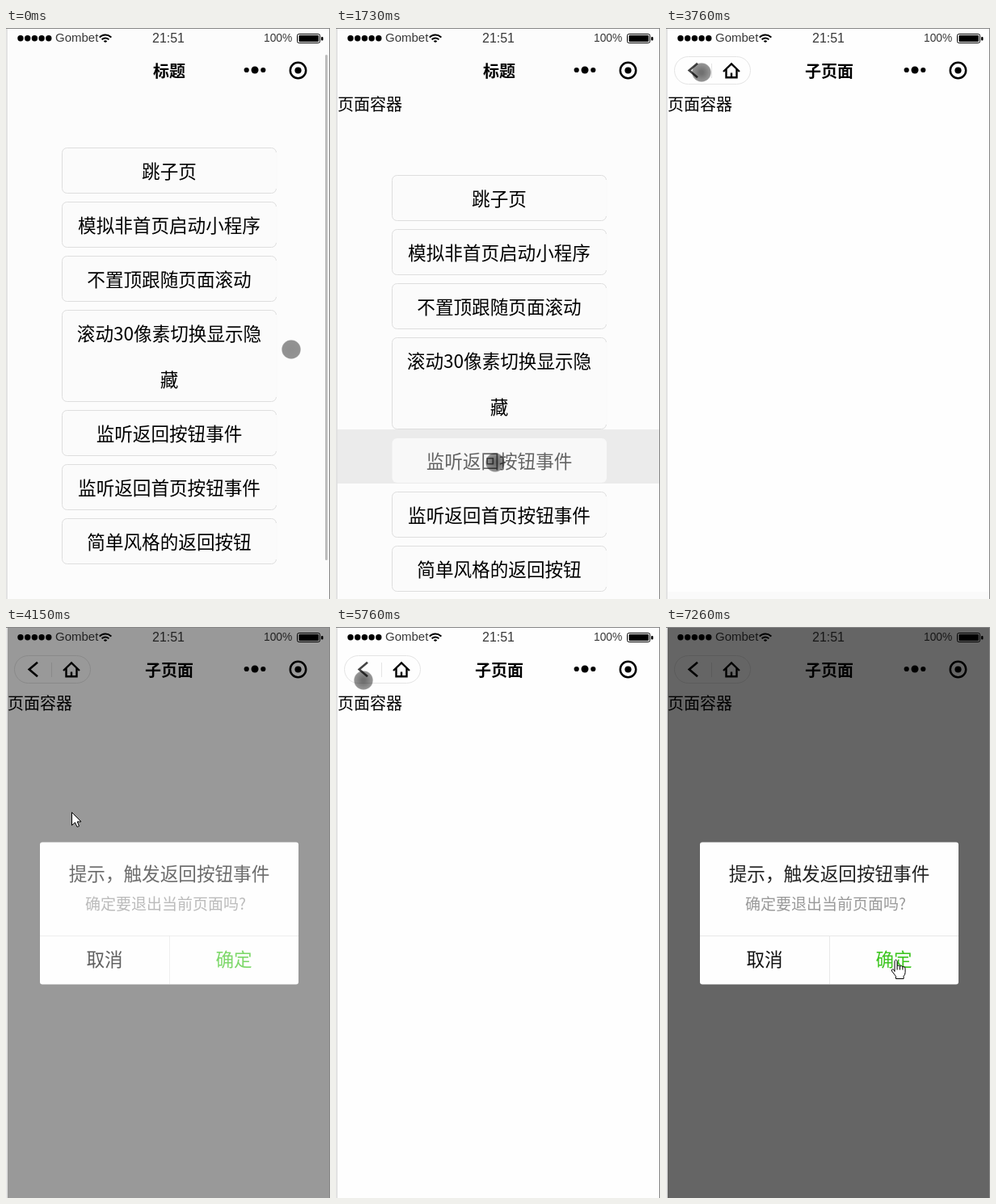
These frames come from a looping animation (401x707 px, 8000 ms). An HTML page with a canvas:

```html
<!DOCTYPE html>
<html lang="zh">
<head>
<meta charset="utf-8">
<title>标题</title>
<style>
html, body { margin: 0; width: 100%; height: 100%; overflow: hidden; background: #fcfcfc; }
canvas { display: block; width: 401px; height: 707px; }
</style>
</head>
<body>
<canvas id="stage" width="401" height="707"></canvas>
<script>
const ctx = document.getElementById('stage').getContext('2d');
const CJK = '"Noto Sans CJK SC", "Noto Sans CJK", sans-serif';
const LATIN = '"Liberation Sans", Arial, sans-serif';
const PAGE = '#fcfcfc', SUBPAGE = '#fefefe', INK = '#000';

// The picture refreshes once per beat; all timing below is in beats.
const LOOP = 8000, BEAT = 134.4, LEAD = 20;

const START = { x: 353, y: 398 };
const MOVES = [
  { from: 4, to: 11, x: 197, y: 538 },
  { from: 18, to: 26, x: 44, y: 55 },
  { from: 29, to: 36, x: 119, y: 411 },
  { from: 36, to: 43, x: 34, y: 66 },
  { from: 45, to: 54, x: 284, y: 411 },
];

const BUTTONS = [['跳子页'], ['模拟非首页启动小程序'], ['不置顶跟随页面滚动'],
  ['滚动30像素切换显示隐', '藏'], ['监听返回按钮事件'], ['监听返回首页按钮事件'], ['简单风格的返回按钮']];
const LINE = 57, GAP = 10;

const clamp = v => Math.min(1, Math.max(0, v));
const within = (t, from, to) => t >= from && t < to;
const ramp = (t, from, to) => clamp((t - from) / (to - from));
const easeOut = (t, from, to) => 1 - (1 - ramp(t, from, to)) ** 2;

function pointerAt(beat) {
  let { x, y } = START;
  for (const move of MOVES) {
    const p = easeOut(beat, move.from, move.to);
    x += (move.x - x) * p;
    y += (move.y - y) * p;
  }
  return { x: Math.round(x), y: Math.round(y) };
}

function dialogLevel(beat) {
  const first = Math.min(ramp(beat, 30, 31.5), 1 - ramp(beat, 36, 38));
  return Math.max(first, ramp(beat, 44, 45.5));
}

function rect(x, y, w, h, color) {
  ctx.fillStyle = color;
  ctx.fillRect(x, y, w, h);
}

function paint(fill, stroke, width = 1) {
  ctx.lineWidth = width;
  if (fill) { ctx.fillStyle = fill; ctx.fill(); }
  if (stroke) { ctx.strokeStyle = stroke; ctx.stroke(); }
}

function round(x, y, w, h, r, fill, stroke) {
  ctx.beginPath();
  ctx.roundRect(x, y, w, h, r);
  paint(fill, stroke);
}

function disc(x, y, r, fill, stroke, width) {
  ctx.beginPath();
  ctx.arc(x, y, r, 0, Math.PI * 2);
  paint(fill, stroke, width);
}

function line(points, color, width) {
  ctx.beginPath();
  points.forEach(([x, y]) => ctx.lineTo(x, y));
  paint(null, color, width);
}

// Places Chinese text by the middle of its em box.
function hanzi(text, x, cy, size, { color = INK, weight = 400, align = 'center' } = {}) {
  ctx.font = `${weight} ${size}px ${CJK}`;
  ctx.textAlign = align;
  ctx.fillStyle = color;
  ctx.fillText(text, x, cy + size * .38);
}

function latin(text, x, baseline, size, align = 'left') {
  ctx.font = `${size}px ${LATIN}`;
  ctx.textAlign = align;
  ctx.fillStyle = '#383838';
  ctx.fillText(text, x, baseline);
}

const title = text => hanzi(text, 202, 53, 20, { weight: 700 });
const pageLabel = cy => hanzi('页面容器', 2, cy, 20, { align: 'left' });

function wifi(x, y) {
  for (let i = 0; i < 3; i++) {
    ctx.beginPath();
    ctx.arc(x, y, 2 + i * 4, -Math.PI * .76, -Math.PI * .24);
    paint(null, INK, 2);
  }
}

function statusBar() {
  for (let i = 0; i < 5; i++) disc(18 + i * 8.7, 12.7, 3.7, INK);
  latin('Gombet', 61, 17, 15);
  wifi(123, 18.5);
  latin('21:51', 201, 18, 16, 'center');
  latin('100%', 319, 17, 13.8);
  round(360.5, 7.5, 28, 11, 2, null, INK);
  round(362.5, 9, 24.5, 8, 1, INK);
  round(390, 11, 2.5, 4.5, 1, INK);
}

function menu() {
  for (const side of [-1, 0, 1]) disc(308 + side * 10.3, 52, side ? 3.1 : 4.5, INK);
  disc(361.5, 52.5, 9.7, null, INK, 2.5);
  disc(361.5, 52.5, 4.1, INK);
}

function button(lines, y, pressed) {
  const h = lines.length * LINE;
  if (pressed) {
    rect(2, y - GAP, 398, LINE + GAP, '#ebebeb');
    round(69.5, y + 1, 265.5, h - 2, 6, '#f8f8f8');
  } else {
    round(69.5, y + .5, 265, h - 1, 6, '#fbfbfb', '#dedede');
    rect(334, y + 6, 2, h - 12, '#fafafa');
  }
  const color = pressed ? 'rgba(0,0,0,.6)' : INK;
  lines.forEach((text, i) => hanzi(text, 202, y + 29 + i * LINE, 22.6, { color }));
}

function homePage(beat) {
  const scroll = 34 * (1 - easeOut(beat, 1, 3));
  rect(2, 1, 398, 706, PAGE);
  pageLabel(94 - scroll);
  let y = 182 - scroll;
  BUTTONS.forEach((lines, i) => {
    button(lines, y, i === 4 && within(beat, 13, 15));
    y += lines.length * LINE + GAP;
  });
  rect(2, 1, 398, 79, PAGE);
  title('标题');
  ctx.globalAlpha = 1 - ramp(beat, 6, 9);
  round(395, 3 + scroll * .885, 3, 626, 1.5, '#bdbdbd');
  ctx.globalAlpha = 1;
}

function capsule(pressed) {
  round(10.5, 35.5, 94, 34, 17, SUBPAGE, '#e4e4e4');
  line([[56.5, 44], [56.5, 62]], '#e4e4e4', 1);
  line([[39, 43.8], [28.7, 52.5], [39, 61.2]], pressed ? '#444' : INK, 2.6);
  line([[71, 54], [81, 44.5], [91, 54]], INK, 2.4);
  line([[74.5, 51], [74.5, 61.3], [87.5, 61.3], [87.5, 51]], INK, 2.4);
  line([[81, 55.5], [81, 61]], INK, 2.4);
}

function subPage(beat, pressed) {
  ctx.save();
  ctx.translate(Math.round(400 * (1 - easeOut(beat, 14, 17))), 0);
  rect(2, 1, 398, 706, SUBPAGE);
  if (beat < 31) rect(2, 698, 398, 9, '#fafafa');
  capsule(pressed);
  title('子页面');
  pageLabel(94);
  ctx.restore();
}

function dialog(level) {
  rect(2, 1, 398, 706, `rgba(0,0,0,${level * .6})`);
  round(42, 266.5, 320, 176, 3, '#fefefe');
  ctx.globalAlpha = level;
  hanzi('提示，触发返回按钮事件', 202, 305, 22.6, { color: '#222' });
  hanzi('确定要退出当前页面吗?', 98, 343, 19, { color: '#999', align: 'left' });
  rect(42, 382, 320, 1, '#e8e8e8');
  rect(202, 382, 1, 60, '#e8e8e8');
  hanzi('取消', 122, 411, 22.6, { color: '#111' });
  hanzi('确定', 282, 411, 22.6, { color: '#3cc51f' });
  ctx.globalAlpha = 1;
}

function touch(x, y, pressed) {
  const shade = ctx.createRadialGradient(x, y, 2, x, y, 12);
  shade.addColorStop(0, `rgba(0,0,0,${pressed ? .56 : .43})`);
  shade.addColorStop(.88, 'rgba(0,0,0,.42)');
  shade.addColorStop(1, 'rgba(0,0,0,.25)');
  disc(x, y, 11.8, shade);
}

const ARROW = new Path2D('M0 0V16L4 12.5L6.5 18L9 17L6.7 11.5H11.5Z');
const HAND = new Path2D('M-1.5 15V2Q0 -1 1.6 2V8Q3.6 6.6 5 8.6Q7 7.2 8.4 9.3' +
  'Q11.6 8.6 11.6 12V16Q11.6 19 9.6 21V24H0V21L-5 14.5Q-5.6 11.4 -2.8 12.6Z' +
  'M1.6 8V13M5 8.6V13M8.4 9.3V13');

function cursor(path, x, y) {
  ctx.save();
  ctx.translate(x + .5, y + .5);
  ctx.fillStyle = '#fff';
  ctx.fill(path);
  ctx.lineWidth = 1;
  ctx.strokeStyle = INK;
  ctx.stroke(path);
  ctx.restore();
}

function draw(beat) {
  const pressed = within(beat, 13, 15) || within(beat, 28, 29) || within(beat, 43, 45);
  const level = dialogLevel(beat);
  const { x, y } = pointerAt(beat);

  rect(0, 0, 401, 707, PAGE);
  rect(0, 0, 2, 707, '#e2e2e2');
  ctx.save();
  ctx.beginPath();
  ctx.rect(2, 1, 398, 706);
  ctx.clip();
  if (beat < 17) homePage(beat);
  if (beat >= 15) subPage(beat, pressed);
  statusBar();
  menu();
  if (level > 0) dialog(level);
  ctx.restore();
  rect(0, 0, 401, 1, '#858585');
  rect(400, 0, 1, 707, '#858585');

  if (level === 0) touch(x, y, pressed);
  else cursor(y > 382 ? HAND : ARROW, x, y);
}

const start = performance.now();
function loop(now) {
  const t = Math.max(0, now - start) % LOOP;
  draw(Math.floor((t + LEAD) / BEAT));
  requestAnimationFrame(loop);
}
draw(0);
requestAnimationFrame(loop);
</script>
</body>
</html>
```
